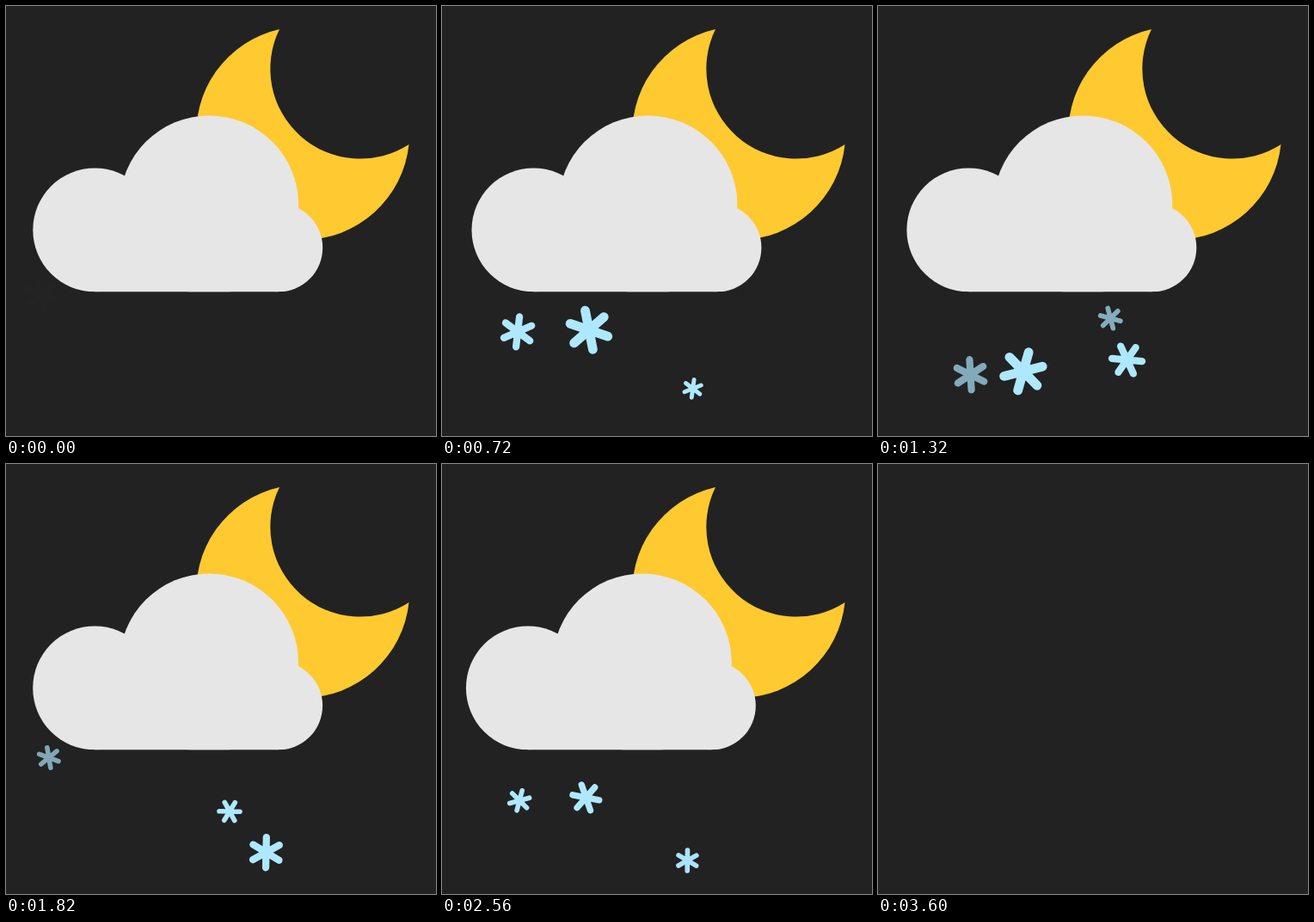
An HTML page for the animation above (3.62 s loop, 500x500 px).

```html
<!DOCTYPE html>
<html lang="en">
<head>
<meta charset="utf-8">
<title>Snowy night</title>
<style>
  html, body { margin: 0; width: 100%; height: 100%; overflow: hidden; background: #222; }
  svg { display: block; width: 100vw; height: 100vh; }
</style>
</head>
<body>
<svg viewBox="0 0 500 500">
  <defs>
    <path id="flake" d="M0-1V1M-.866-.5L.866 .5M-.866 .5L.866-.5"
      fill="none" stroke="#aee8ff" stroke-width=".47" stroke-linecap="round"/>
    <clipPath id="base"><rect width="500" height="332.3"/></clipPath>
    <path id="left" d="M41 335C65 353 88 365 89.5 386S104 424 119 445"/>
    <path id="middle" d="M181 334C181 358 165 385 164 405S180 437 186 455"/>
    <path id="right" d="M276 354C266 368 260 385 260 403S277 454 302 482"/>
  </defs>
  <g id="scene">
    <path fill="#ffc930" d="M318 27A124 124 0 1 0 468.5 161A104.6 104.6 0 0 1 318 27Z"/>
    <g id="snow"></g>
    <g id="cloud" fill="#e6e6e6" clip-path="url(#base)">
      <circle cx="103.3" cy="260.4" r="72"/>
      <circle cx="236.2" cy="231.4" r="104"/>
      <circle cx="316.8" cy="281" r="51.4"/>
      <rect x="103.3" y="260" width="213.5" height="80"/>
    </g>
  </g>
</svg>
<script>
const LOOP = 3620, END = 3600, SWAY = 4, FADE_IN = 180, FADE_OUT = 320;
const $ = id => document.getElementById(id);
const scene = $('scene'), snow = $('snow'), cloud = $('cloud');

// Lanes: path, time to fall, starting angle, degrees turned in a second, ease power
const left = { path: $('left'), life: 1540, tilt: -10, spin: 35, ease: 2.3 };
const middle = { path: $('middle'), life: 1550, tilt: 18, spin: -55, ease: 1 };
const right = { path: $('right'), life: 1680, tilt: -13, spin: -30, ease: 1.4 };

const flakes = [
  { ...left, birth: 0, size: 17.6 },
  { ...left, birth: 1700, size: 11.9 },
  { ...middle, birth: 190, size: 23 },
  { ...middle, birth: 1890, size: 15.7 },
  { ...right, birth: -600, size: 10.4, dx: 8.5, dy: -13, tilt: -8 },
  { ...right, birth: 730, size: 17.6, dx: 29.5, dy: 10.5, tilt: 0, spin: -52 },
  { ...right, birth: 1195, size: 12 }
].map(flake => {
  const el = document.createElementNS('http://www.w3.org/2000/svg', 'use');
  el.setAttribute('href', '#flake');
  snow.append(el);
  return { dx: 0, dy: 0, length: flake.path.getTotalLength(), el, ...flake };
});

function drawFlake(f, t) {
  const age = t - f.birth;
  const alpha = Math.max(0, Math.min(1, t / FADE_IN, age / FADE_IN, (f.life - age) / FADE_OUT));
  f.el.setAttribute('opacity', alpha);
  if (!alpha) return;
  const { x, y } = f.path.getPointAtLength(f.length * age / f.life);
  const angle = f.tilt + f.spin * (age / 1000) ** f.ease;
  f.el.setAttribute('transform',
    `translate(${x + f.dx} ${y + f.dy}) rotate(${angle}) scale(${f.size})`);
}

// Triangle wave: right, back, left, back
function sway(t) {
  const p = t / END * 4;
  return SWAY * (p < 1 ? p : p < 3 ? 2 - p : p - 4);
}

function draw(time) {
  const t = time % LOOP;
  scene.setAttribute('visibility', t < END ? 'visible' : 'hidden');
  cloud.setAttribute('transform', `translate(${sway(t)} 0)`);
  flakes.forEach(f => drawFlake(f, t));
}

const origin = performance.now();
function tick() {
  draw(performance.now() - origin);
  requestAnimationFrame(tick);
}
draw(0);
requestAnimationFrame(tick);
</script>
</body>
</html>
```
